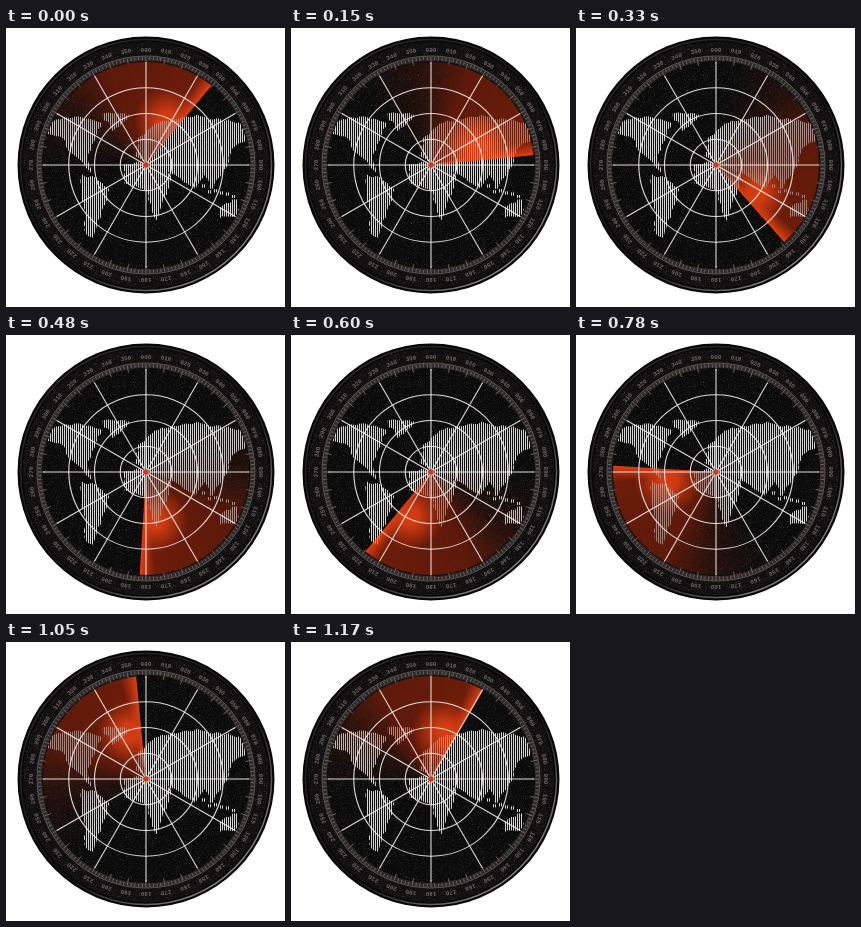
Animation of 279x279 px, one loop 1.2 s. Source, as an HTML page with a canvas:

```html
<!DOCTYPE html>
<html lang="en">
<head>
<meta charset="utf-8">
<title>Radar</title>
<style>
  html, body { margin: 0; width: 100%; height: 100%; overflow: hidden; background: #fff; }
  #stage { position: relative; width: 100%; height: 100%; overflow: hidden; }
  canvas { position: absolute; left: 0; top: 0; }
  #sweep { transform-origin: 140px 137px; }
</style>
</head>
<body>
<div id="stage">
  <canvas id="base" width="279" height="279"></canvas>
  <canvas id="sweep" width="279" height="279"></canvas>
  <canvas id="grid" width="279" height="279"></canvas>
</div>
<script>
const SIZE = 279, CX = 140, CY = 137, R = 103;
const PERIOD = 1200, STEPS = 40, HEAD = 39.5;
const rad = deg => deg * Math.PI / 180;
const context = id => document.getElementById(id).getContext('2d');

let seed = 7;
const rnd = () => (seed = seed * 16807 % 2147483647) / 2147483647;

// Key points of each coastline; the detail between them is random.
const land = [
  '39,104 44,93 72,88 95,95 82,128 84,144 62,120 54,108',
  '96,86 125,86 108,103',
  '75,148 88,148 103,162 86,211 79,203',
  '118,137 140,133 158,138 166,150 149,193 140,162 118,156',
  '130,129 132,112 148,95 190,88 241,96 241,112 226,118 221,140 205,162 198,146 190,160 158,142',
  '214,179 230,171 234,188 214,190'
].map(s => s.split(' ').map(p => p.split(',').map(Number)));

function coast(points) {
  const path = new Path2D();
  points.forEach(([x, y], i) => {
    const [nx, ny] = points[(i + 1) % points.length];
    const parts = Math.ceil(Math.hypot(nx - x, ny - y) / 4);
    for (let k = 0; k < parts; k++) {
      const f = k / parts;
      path.lineTo(x + (nx - x) * f + rnd() * 3 - 1.5, y + (ny - y) * f + rnd() * 3 - 1.5);
    }
  });
  path.closePath();
  return path;
}

function islands() {
  const path = new Path2D();
  for (let i = 0; i < 6; i++) path.rect(196 + 6 * i, 156 + 2 * i + rnd() * 5, 4, 3);
  return path;
}

const shapes = [...land.map(coast), islands()];

function circle(c, r) {
  c.beginPath();
  c.arc(CX, CY, r, 0, 2 * Math.PI);
}

function disc(c, r, fill) {
  circle(c, r);
  c.fillStyle = fill;
  c.fill();
}

function ring(c, r, color, width) {
  circle(c, r);
  c.strokeStyle = color;
  c.lineWidth = width;
  c.stroke();
}

function ray(c, deg, r0, r1, color, width) {
  const x = Math.sin(rad(deg)), y = -Math.cos(rad(deg));
  c.beginPath();
  c.moveTo(CX + x * r0, CY + y * r0);
  c.lineTo(CX + x * r1, CY + y * r1);
  c.strokeStyle = color;
  c.lineWidth = width;
  c.stroke();
}

function drawMap(c, alpha) {
  c.save();
  c.globalAlpha = alpha;
  circle(c, R);
  c.clip();
  for (const shape of shapes) {
    c.save();
    c.clip(shape);
    c.fillStyle = '#d6d6d6';
    for (let x = 0; x < SIZE; x += 2) c.fillRect(x, 0, 1, SIZE);
    c.restore();
  }
  c.restore();
}

function drawDial(c) {
  disc(c, 128.5, '#080707');
  const rim = c.createLinearGradient(60, 40, 230, 230);
  rim.addColorStop(0, '#2a2828');
  rim.addColorStop(.6, '#151414');
  rim.addColorStop(1, '#8a8886');
  ring(c, 125.5, rim, 1.5);
  disc(c, 123, '#110f0f');
  ring(c, 106.5, '#2c2827', 5);
  disc(c, R + 1, '#0b0b0b');
  c.fillStyle = 'rgba(255,255,255,.06)';
  for (let i = 0; i < 9000; i++) {
    const a = rnd() * 2 * Math.PI, r = 124 * Math.sqrt(rnd());
    c.fillRect(Math.floor(CX + r * Math.cos(a)), Math.floor(CY + r * Math.sin(a)), 1, 1);
  }
}

function drawScale(c) {
  for (let deg = 0; deg < 360; deg += 2)
    ray(c, deg, deg % 10 ? R + 2 : R - 2, R + 5, '#6e6663', 1);
  ring(c, R + 6, '#5c5553', 1);
  c.font = 'bold 6px "Liberation Mono", monospace';
  c.textAlign = 'center';
  c.textBaseline = 'middle';
  c.fillStyle = '#6c6562';
  for (let deg = 0; deg < 360; deg += 10) {
    c.save();
    c.translate(CX, CY);
    c.rotate(rad(deg));
    c.fillText(String(deg).padStart(3, '0'), 0, -115);
    c.restore();
  }
}

// The beam points straight up here; the animation turns it.
function drawSweep(c) {
  c.beginPath();
  c.moveTo(CX, CY);
  c.arc(CX, CY, R, rad(-225), rad(-90));
  c.clip();
  const trail = c.createConicGradient(rad(-90), CX, CY);
  const stop = (behind, color) => trail.addColorStop(1 - behind / 360, color);
  stop(130, 'rgba(60,25,18,0)');
  stop(92, 'rgba(85,25,12,.35)');
  stop(62, 'rgba(108,27,8,.84)');
  stop(9, 'rgba(116,29,8,.9)');
  stop(2, 'rgba(205,56,16,.95)');
  stop(0, 'rgba(224,62,20,1)');
  c.fillStyle = trail;
  c.fillRect(0, 0, SIZE, SIZE);

  const gx = CX - 12, gy = CY - 48;
  const glow = c.createRadialGradient(gx, gy, 8, gx, gy, 33);
  glow.addColorStop(0, 'rgba(214,60,18,.95)');
  glow.addColorStop(1, 'rgba(214,60,18,0)');
  c.fillStyle = glow;
  c.fillRect(0, 0, SIZE, SIZE);
}

function drawGrid(c) {
  for (let deg = 0; deg < 360; deg += 30) ray(c, deg, 0, R, 'rgba(245,240,238,.9)', 1.1);
  for (let i = 1; i < 4; i++) ring(c, R * i / 4, 'rgba(245,240,238,.9)', 1.1);
  disc(c, 2.8, '#d03a18');
}

const base = context('base'), grid = context('grid');
drawDial(base);
drawScale(base);
drawMap(base, 1);
drawSweep(context('sweep'));
drawMap(grid, .45);
drawGrid(grid);

document.getElementById('sweep').animate(
  [{ transform: `rotate(${HEAD}deg)` }, { transform: `rotate(${HEAD + 360}deg)` }],
  { duration: PERIOD, iterations: Infinity, easing: `steps(${STEPS}, end)` }
);
</script>
</body>
</html>
```
